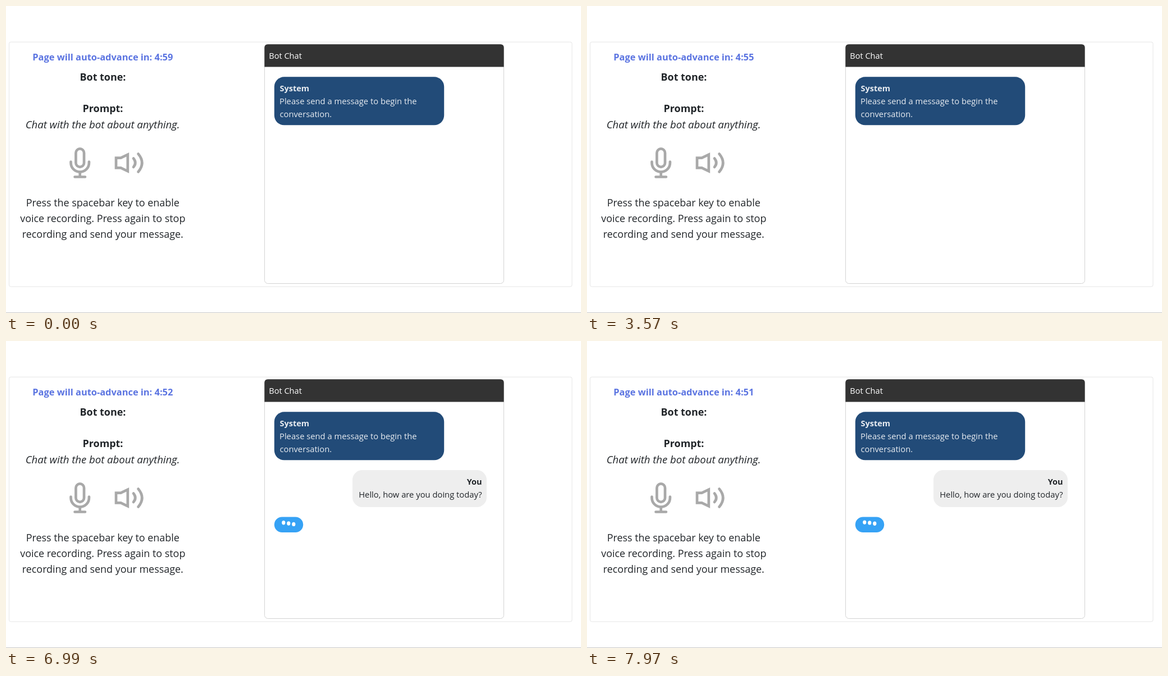
These frames come from a looping animation (1024x547 px, 8000 ms). An HTML page:

```html
<!DOCTYPE html>
<html lang="en">
<head>
<meta charset="utf-8">
<title>Bot chat</title>
<style>
  html, body { margin: 0; width: 100%; height: 100%; overflow: hidden; background: #fff; }
  svg { display: block; width: 100%; height: 100%; }
  text { font: 17.9px "Open Sans", "Noto Sans", sans-serif; fill: #212529; }
  .centered { text-anchor: middle; }
  .bold { font-weight: 700; }
  .timer { font-size: 16.4px; fill: #5b74e1; }
  .prompt { font-size: 18.6px; font-style: italic; }
  .chat text { font-size: 14.75px; }
  .chat .bold { font-size: 14.5px; }
  .chat .light { fill: #e9edf2; }
  .chat .title { font-size: 14.6px; fill: #fff; }
  .icon { fill: none; stroke: #a9a9a9; stroke-width: 4.7; stroke-linecap: round; }
</style>
</head>
<body>
<svg viewBox="0 0 1024 547">
  <rect x="5.5" y="64.2" width="1002.5" height="435.8" rx="3" fill="none" stroke="#e6e6e6"/>
  <path d="M0 546.5H1024" stroke="#c8c8c8"/>

  <text id="timer" class="timer bold" x="47.3" y="97"></text>
  <g class="centered">
    <text class="bold" x="172.5" y="133">Bot tone:</text>
    <text class="bold" x="172.5" y="189">Prompt:</text>
    <text class="prompt" x="172" y="218">Chat with the bot about anything.</text>
    <text x="172.3" y="356.5">Press the spacebar key to enable</text>
    <text x="172.3" y="385">voice recording. Press again to stop</text>
    <text x="172.3" y="413.3">recording and send your message.</text>
  </g>

  <g id="mic" class="icon">
    <rect x="124.4" y="254.4" width="14.6" height="32.4" rx="7.3"/>
    <path d="M115.5 277.5v2a16.2 16.2 0 0 0 32.4 0v-2M131.7 295.7v8.8M122.5 304.5h18.4"/>
  </g>
  <g class="icon">
    <path d="M196 270.7h8.5l12.3-6v29.6l-12.3-6H196z"/>
    <path d="M227 271.5q6.5 8 0 15.5M235.5 263.5q13.5 16 0 32"/>
  </g>

  <g class="chat">
    <rect x="460.5" y="68.5" width="426" height="426" rx="6" fill="#fff" stroke="#d3d3d3"/>
    <path d="M460.3 108.6V74.3q0-6 6-6H880.6q6 0 6 6V108.6z" fill="#333"/>
    <text class="title" x="468.2" y="94">Bot Chat</text>

    <rect x="477.8" y="126.3" width="302.4" height="86" rx="17.5" fill="#224b78"/>
    <text class="light bold" x="487.5" y="152">System</text>
    <text class="light" x="487" y="175">Please send a message to begin the</text>
    <text class="light" x="487.5" y="198">conversation.</text>

    <g id="reply">
      <rect x="617" y="230" width="239" height="66" rx="17.5" fill="#eee"/>
      <g text-anchor="end">
        <text class="bold" x="847.5" y="255.5">You</text>
        <text x="847.5" y="278.7">Hello, how are you doing today?</text>
      </g>
      <rect x="477.8" y="313.5" width="51.4" height="27.5" rx="13.75" fill="#36a2f5"/>
      <g id="dots" fill="#fff">
        <ellipse cx="494.3" cy="327.2" rx="3.1" ry="3.7"/>
        <ellipse cx="503.3" cy="327.2" rx="3.1" ry="3.7"/>
        <ellipse cx="512.3" cy="327.2" rx="3.1" ry="3.7"/>
      </g>
    </g>
  </g>
</svg>
<script>
  const LOOP = 8000;
  const TICKS = [590, 1600, 2560, 3570, 4540, 5540, 6530, 7530];
  const MIC_ON = 690, MIC_OFF = 3140;
  const REPLY_AT = 6460;
  const BOUNCE = { delay: 200, stagger: 100, period: 900, height: 4.2 };

  const [timer, mic, reply, dots] =
    ["timer", "mic", "reply", "dots"].map(id => document.getElementById(id));

  function dotLift(elapsed) {
    if (elapsed <= 0) return 0;
    return BOUNCE.height * (1 - Math.cos(2 * Math.PI * elapsed / BOUNCE.period)) / 2;
  }

  function draw() {
    const t = performance.now() % LOOP;
    const seconds = 59 - TICKS.filter(tick => t >= tick).length;
    timer.textContent = `Page will auto-advance in: 4:${seconds}`;
    mic.style.stroke = t >= MIC_ON && t < MIC_OFF ? "#36a2f5" : "#a9a9a9";
    reply.style.display = t >= REPLY_AT ? "" : "none";
    [...dots.children].forEach((dot, i) => {
      const start = REPLY_AT + BOUNCE.delay + i * BOUNCE.stagger;
      dot.setAttribute("transform", `translate(0 ${-dotLift(t - start)})`);
    });
    requestAnimationFrame(draw);
  }
  draw();
</script>
</body>
</html>
```
